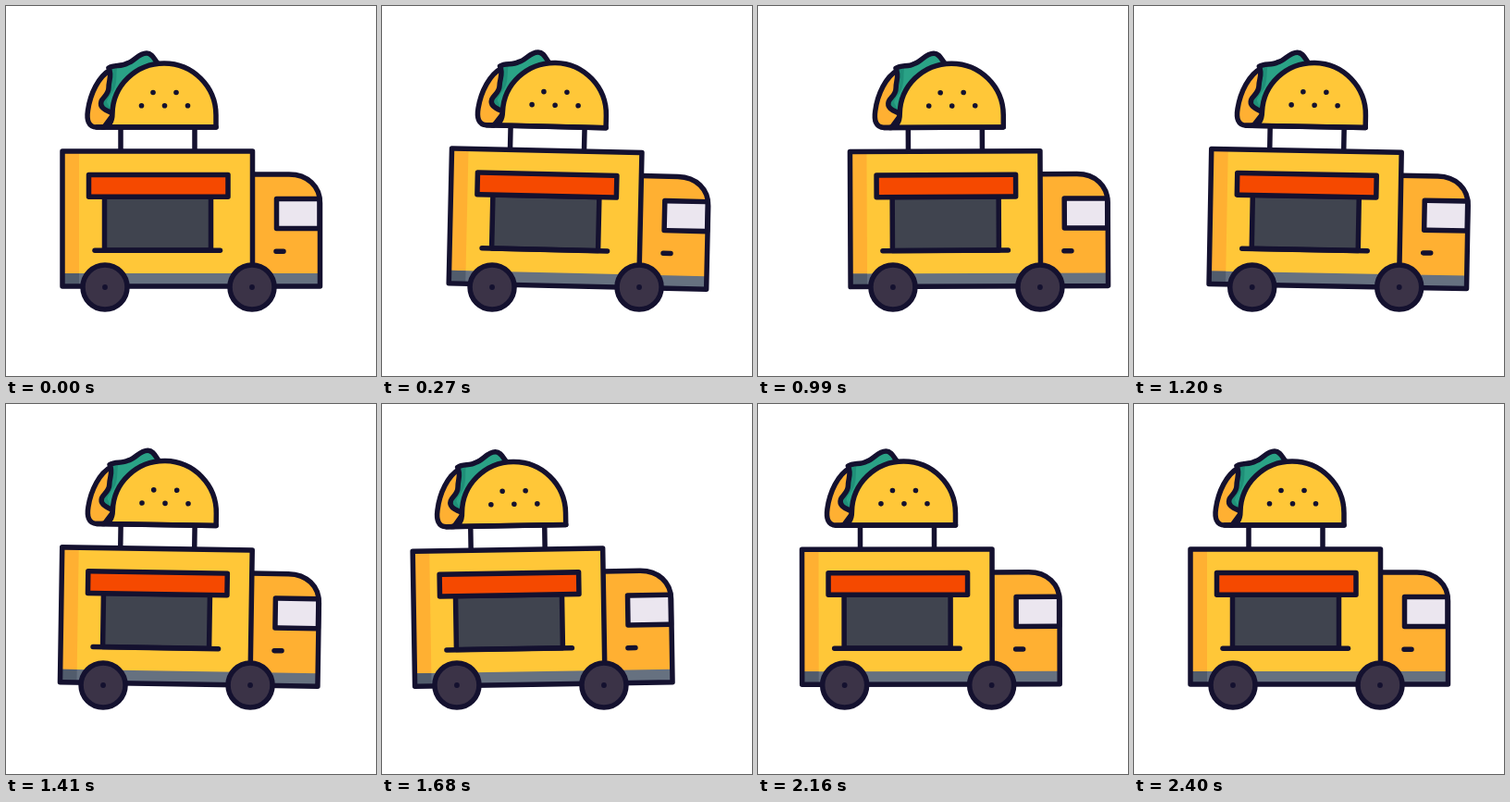
An HTML page that plays this animation: 400 by 400 pixels, repeating every 4.93 s.

```html
<!DOCTYPE html>
<html lang="en">
<head>
<meta charset="utf-8">
<title>Taco truck</title>
<style>
  html, body { margin: 0; width: 100%; height: 100%; overflow: hidden; background: #fff; }
  svg { display: block; width: 100vw; height: 100vh; }
  .ink { stroke: #14112f; stroke-width: 5.5; stroke-linejoin: round; stroke-linecap: round; }
  .line { fill: none; }
  .yellow { fill: #ffc738; }
  .orange { fill: #ffb032; }
  .dot { fill: #14112f; }
</style>
</head>
<body>
<svg viewBox="0 0 400 400">
  <g id="truck">
    <g id="body">
      <!-- sign -->
      <path class="ink line" d="M124 132V157M204 132V157"/>
      <path class="ink orange" d="M113 69C100 76 91 95 88.500 113C87 123 89 131 98 131H106L120 112L122 70Z"/>
      <path fill="#2aa286" d="M111 67C117 63 124 66 131 62C139 60 143 51 152 51C158 51 160 57 164 62L150 90L113 115C106 112 101 109 103 103C105 98 111 96 111 88C111 80 115 75 111 67Z"/>
      <path fill="#1f8f78" d="M111 67L120 66C119 74 120 80 118 87C116 94 110 98 109 104L114 114C106 112 101 109 103 103C105 98 111 96 111 88C111 80 115 75 111 67Z"/>
      <path class="ink line" d="M111 67C117 63 124 66 131 62C139 60 143 51 152 51C158 51 160 57 164 62M111 67C115 75 111 80 111 88C111 96 105 98 103 103C101 109 106 112 113 115"/>
      <path class="ink yellow" d="M171 62A56 56 0 0 1 227 118V131H104C114 130 115 122 115 116A56 55 0 0 1 171 62Z"/>
      <path class="ink line" d="M98 131H227"/>
      <g class="dot">
        <circle cx="159" cy="93.500" r="2.800"/><circle cx="184" cy="93.500" r="2.800"/>
        <circle cx="146.500" cy="107.800" r="2.800"/><circle cx="171.500" cy="107.800" r="2.800"/><circle cx="196.500" cy="107.800" r="2.800"/>
      </g>
      <!-- cab -->
      <path class="orange" d="M266 182H306Q339.500 184 339.500 215V303H266Z"/>
      <path fill="#667180" d="M266 289H339V303H266Z"/>
      <path class="ink" fill="#ebe6ef" d="M339 208.500H292.500V240.500H339Z"/>
      <path class="ink line" d="M266.500 182H306C326 182 339.500 195 339.500 213V303H266.500M292 265.200H300"/>
      <!-- box -->
      <path class="yellow" d="M61 157H266.500V303H61Z"/>
      <path class="orange" d="M61 157H79V303H61Z"/>
      <path fill="#667180" d="M61 289H266.500V303H61Z"/>
      <path fill="#515c6c" d="M61 289H79V303H61Z"/>
      <path class="ink line" d="M61 157H266.500V303H61Z"/>
      <path class="ink" fill="#40444f" d="M106.500 206H221.500V264H106.500Z"/>
      <path class="ink" fill="#f54900" d="M89.500 182.500H240V206.200H89.500Z"/>
      <path class="ink line" d="M96 264.200H231.500"/>
    </g>
    <g fill="#3b3347">
      <circle class="ink" cx="107" cy="304" r="24"/>
      <circle class="ink" cx="266" cy="304" r="24"/>
    </g>
    <g class="dot">
      <circle cx="107" cy="304" r="2.900"/>
      <circle cx="266" cy="304" r="2.900"/>
    </g>
  </g>
</svg>
<script>
  const LOOP = 4930, STEP = 30;

  // [time in ms, value], eased in and out between entries
  const DRIVE = [[0, 0], [800, 45.5], [1860, -32], [2400, 0]];
  const TILT = [[0, 0], [260, 1.3], [770, -1.2], [1290, 1.25], [1800, -1.3], [2220, 0]];

  const truck = document.getElementById('truck');
  const body = document.getElementById('body');

  function valueAt(track, t) {
    for (let i = 1; i < track.length; i++) {
      const [t0, a] = track[i - 1], [t1, b] = track[i];
      if (t < t1) {
        const s = (t - t0) / (t1 - t0);
        return a + (b - a) * s * s * (3 - 2 * s);
      }
    }
    return track[track.length - 1][1];
  }

  function draw() {
    const now = performance.now() % LOOP;
    const t = Math.floor(now / STEP) * STEP;
    truck.setAttribute('transform', `translate(${valueAt(DRIVE, t)} 0)`);
    body.setAttribute('transform', `rotate(${valueAt(TILT, t)} 200 265)`);
    requestAnimationFrame(draw);
  }
  draw();
</script>
</body>
</html>
```
